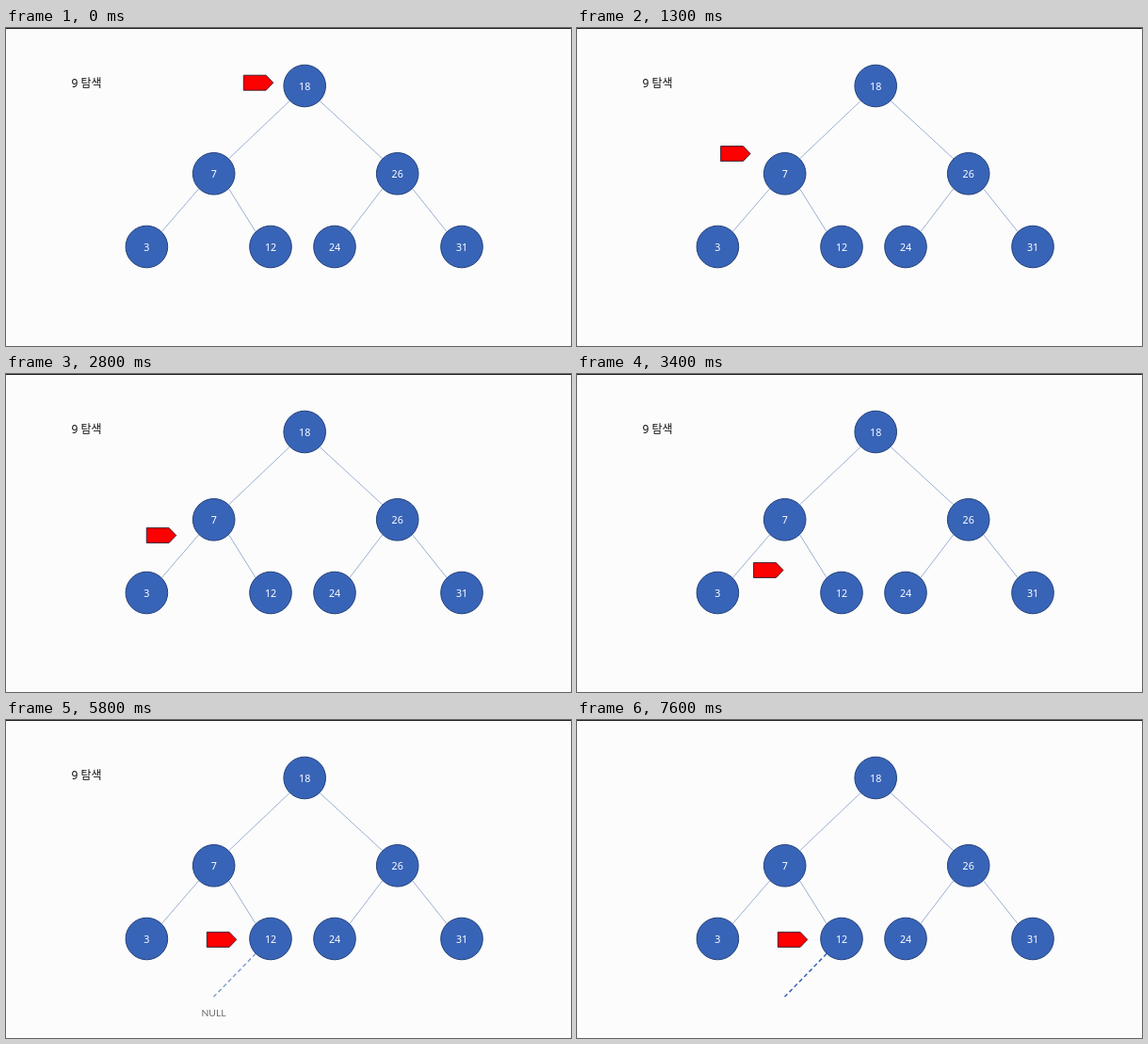
An HTML page with a canvas that plays this animation: 600 px wide and 338 px high, repeating every 8000 ms.

```html
<!DOCTYPE html>
<html lang="ko">
<head>
<meta charset="utf-8">
<title>Binary search tree</title>
<style>
html, body { margin: 0; width: 100%; height: 100%; overflow: hidden; background: #fcfcfc; }
canvas { display: block; }
</style>
</head>
<body>
<canvas id="stage" width="600" height="338"></canvas>
<script>
const ctx = document.getElementById('stage').getContext('2d');
const LOOP = 8000;
const RADIUS = 22.3;
const DIAGONAL = RADIUS * Math.SQRT1_2;

const nodes = {
  18: [317.2, 61.5],
  7: [220.7, 154.8],
  26: [415.7, 154.8],
  3: [149.4, 232.5],
  12: [281, 232.5],
  24: [349, 232.5],
  31: [484, 232.5]
};
const edges = [[18, 7], [18, 26], [7, 3], [7, 12], [26, 24], [26, 31]];

const stops = [[252.3, 58.2], [128.7, 151.7], [213.3, 233.4]];
const moves = [110, 2420];
const MOVE_TIME = 2020;

const clamp = v => Math.min(1, Math.max(0, v));
const ramp = (t, start, length) => clamp((t - start) / length);

// Short acceleration followed by a long deceleration.
function glide(u) {
  const a = 0.13;
  return u < a ? u * u / a : 1 - (1 - u) ** 2 / (1 - a);
}

function line(x1, y1, x2, y2, color, width, dash = []) {
  ctx.strokeStyle = color;
  ctx.lineWidth = width;
  ctx.setLineDash(dash);
  ctx.beginPath();
  ctx.moveTo(x1, y1);
  ctx.lineTo(x2, y2);
  ctx.stroke();
  ctx.setLineDash([]);
}

function label(text, x, y, font, color, align = 'center') {
  ctx.font = font;
  ctx.fillStyle = color;
  ctx.textAlign = align;
  ctx.fillText(text, x, y);
}

function withAlpha(alpha, paint) {
  if (alpha <= 0) return;
  ctx.globalAlpha = alpha;
  paint();
  ctx.globalAlpha = 1;
}

function drawTree() {
  for (const [from, to] of edges) {
    const [x1, y1] = nodes[from], [x2, y2] = nodes[to];
    const side = Math.sign(x2 - x1) * DIAGONAL;
    line(x1 + side, y1 + DIAGONAL, x2 - side, y2 - DIAGONAL, '#4a6fb0', 0.55);
  }
  for (const [value, [x, y]] of Object.entries(nodes)) {
    ctx.beginPath();
    ctx.arc(x, y, RADIUS, 0, Math.PI * 2);
    ctx.fillStyle = '#3864b8';
    ctx.fill();
    ctx.strokeStyle = '#213f78';
    ctx.lineWidth = 1;
    ctx.stroke();
    label(value, x, y + 4, '10.7px "Noto Sans", sans-serif', '#fff');
  }
}

function arrowPosition(t) {
  let [x, y] = stops[0];
  moves.forEach((start, i) => {
    const p = glide(ramp(t, start, MOVE_TIME));
    x += (stops[i + 1][0] - stops[i][0]) * p;
    y += (stops[i + 1][1] - stops[i][1]) * p;
  });
  return [x, y];
}

function drawArrow(x, y) {
  ctx.beginPath();
  ctx.moveTo(x, y - 8);
  ctx.lineTo(x + 23.8, y - 8);
  ctx.lineTo(x + 31.5, y);
  ctx.lineTo(x + 23.8, y + 8);
  ctx.lineTo(x, y + 8);
  ctx.closePath();
  ctx.fillStyle = '#fe0000';
  ctx.fill();
  ctx.strokeStyle = '#301c30';
  ctx.lineWidth = 0.9;
  ctx.stroke();
}

function draw(t) {
  ctx.fillStyle = '#fcfcfc';
  ctx.fillRect(0, 0, 600, 338);
  ctx.fillStyle = '#222';
  ctx.fillRect(0, 0, 600, 1);

  const appear = ramp(t, 5500, 500);
  const vanish = 1 - ramp(t, 6950, 500);

  withAlpha(vanish, () =>
    label('9 탐색', 69.5, 63, '12px "Noto Sans", "Noto Sans CJK KR", "Noto Sans CJK", sans-serif', '#111', 'left'));
  drawTree();
  withAlpha(appear, () => {
    const [x, y] = nodes[12];
    line(x - DIAGONAL, y + DIAGONAL, 220.5, 294.3, '#3864b8', 1.5, [4.5, 3]);
  });
  withAlpha(appear * vanish, () =>
    label('NULL', 220.5, 314.5, '10.4px Lato, sans-serif', '#111'));
  drawArrow(...arrowPosition(t));
}

const begin = performance.now();
function tick() {
  draw((performance.now() - begin) % LOOP);
  requestAnimationFrame(tick);
}
tick();
</script>
</body>
</html>
```
